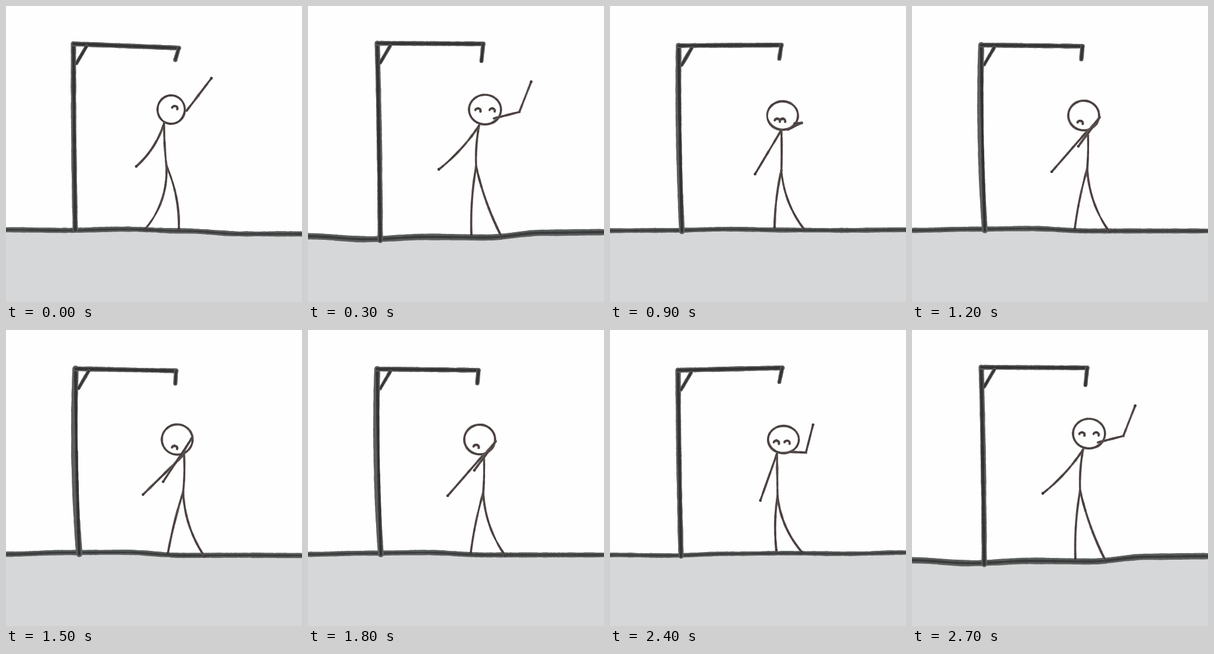
Recreate the animation shown at these times as an HTML page with a canvas. Size 500 by 500 pixels, loop 3000 ms.

```html
<!DOCTYPE html>
<html lang="en">
<head>
<meta charset="utf-8">
<title>Beckoning stick figure</title>
<style>
html, body { margin: 0; height: 100%; overflow: hidden; background: #fefefe; }
canvas { display: block; width: 100vmin; height: 100vmin; }
</style>
</head>
<body>
<canvas id="stage" width="500" height="500"></canvas>
<script>
// Joints are [x, y]; a third number bows the limb that ends there.
const reach = {
  ground: [378, 379, 377, 380, 385, 385], thick: 8.5,
  top: [114, 64], tip: [292, 71], drop: [286, 91], base: [117, 378, 1],
  head: [279, 175, 23, 24], eyes: [285, 173, 0],
  neck: [267, 198], hip: [271, 270, 1], feet: [[235, 377, -11], [292, 376, -6]],
  shoulder: [305, 177], elbow: [325, 151], hand: [347, 122], rest: [220, 271, -6]
};
const bend = {
  ground: [389, 394, 390, 391, 383, 382], thick: 10.5,
  top: [117, 63], tip: [296, 64], drop: [293, 93], base: [122, 396, -1],
  head: [299, 175, 27, 25], eyes: [287, 177, 24],
  neck: [289, 202], hip: [284, 271, 2], feet: [[276, 386, 3], [327, 390, 4]],
  shoulder: [314, 190], elbow: [357, 179], hand: [377, 128], rest: [221, 276, -4]
};
const raise = {
  ground: [380, 381, 378, 377, 378, 376], thick: 7.5,
  top: [115, 68], tip: [291, 64], drop: [286, 88], base: [120, 382, 1],
  head: [293, 185, 26, 23], eyes: [281, 191, 18],
  neck: [282, 209], hip: [283, 280, 0], feet: [[281, 372, 3], [324, 375, 8]],
  shoulder: [304, 206], elbow: [331, 207], hand: [343, 160], rest: [254, 288, 0]
};
const tuck = {
  ground: [379, 377, 376, 380, 380, 380], thick: 8.5,
  top: [117, 66], tip: [288, 68], drop: [286, 90], base: [123, 379, 4],
  head: [290, 185, 26, 25], eyes: [284, 198, 0],
  neck: [297, 210], hip: [296, 275, -1], feet: [[275, 376, 2], [333, 381, 8]],
  shoulder: [297, 212], elbow: [317, 188], hand: [281, 237], rest: [236, 280, 0]
};

// Blends numbers, lists and whole poses; k may run past 1
function mix(a, b, k) {
  if (typeof a === 'number') return a + (b - a) * k;
  if (Array.isArray(a)) return a.map((v, i) => mix(v, b[i], k));
  return Object.fromEntries(Object.keys(a).map(key => [key, mix(a[key], b[key], k)]));
}

let seed = 7;
const random = () => (seed = seed * 16807 % 2147483647) / 2147483647;

const trace = (n, point) => Array.from({ length: n + 1 }, (_, i) => point(i / n));

function line(a, b, bow = 0) {
  const dx = b[0] - a[0], dy = b[1] - a[1], len = Math.hypot(dx, dy);
  return trace(Math.ceil(len), t => {
    const off = 4 * t * (1 - t) * bow / len;
    return [a[0] + dx * t - dy * off, a[1] + dy * t + dx * off];
  });
}

const oval = (x, y, rx, ry, from, to) => trace(180, t => {
  const angle = (from + (to - from) * t) * Math.PI;
  return [x + rx * Math.cos(angle), y + ry * Math.sin(angle)];
});

function drawing(pose) {
  const canvas = document.createElement('canvas');
  canvas.width = canvas.height = 500;
  const g = canvas.getContext('2d');

  function marker(path, width, color) {
    let wobble = 0;
    g.fillStyle = color;
    g.beginPath();
    for (const [x, y] of path) {
      wobble = wobble * .9 + (random() - .5) * .25;
      const r = width / 2 + wobble;
      g.moveTo(x + r, y);
      g.arc(x, y, r, 0, 2 * Math.PI);
    }
    g.fill();
  }
  function pen(path) {
    marker(path, 4, '#6a615f');
    marker(path, 2.2, '#433b3a');
  }
  function limb(a, b) {
    pen(line(a, b, b[2]));
    marker([b], 4.6, '#433b3a');
  }
  function beam(a, b, width = 8, bow = 0) {
    marker(line(a, b, bow), width + Math.abs(bow) / 2, '#5b605e');
    marker(line(a, b, bow / 4), width * .55, '#353234');
  }

  g.fillStyle = '#fefefe';
  g.fillRect(0, 0, 500, 500);

  const ground = trace(500, t => {
    const i = Math.min(4, Math.floor(t * 5));
    const ease = (1 - Math.cos((t * 5 - i) * Math.PI)) / 2;
    return [t * 500, mix(pose.ground[i], pose.ground[i + 1], ease)];
  });
  g.fillStyle = '#d6d7d9';
  g.beginPath();
  g.moveTo(0, 500);
  for (const p of ground) g.lineTo(...p);
  g.lineTo(500, 500);
  g.fill();
  marker(ground, pose.thick, '#5b605e');
  marker(ground, pose.thick * .4, '#3c3b3c');

  const { top, tip, base, neck, hip } = pose;
  beam(top, base, 8.5, base[2]);
  beam(top, tip);
  beam(tip, pose.drop, 7);
  beam([top[0] + 22, top[1] + 4], [top[0] + 5, top[1] + 33], 6);

  pen(oval(...pose.head, 0, 2));
  const [x, y, gap] = pose.eyes;
  for (const eye of gap > 8 ? [x, x + gap] : [x]) pen(oval(eye, y, 4.5, 4, 1.1, 2.1));

  limb(neck, hip);
  for (const foot of pose.feet) limb(hip, foot);
  limb(neck, pose.rest);
  limb(pose.shoulder, pose.elbow);
  limb(pose.elbow, pose.hand);
  return canvas;
}

const sheets = [reach, bend, raise, mix(raise, tuck, .5), tuck, mix(raise, tuck, 1.25)].map(drawing);
const ctx = document.getElementById('stage').getContext('2d');
const start = performance.now();

function show(now) {
  const step = Math.floor(Math.max(0, now - start) % 3000 / 300);
  ctx.drawImage(sheets[5 - Math.abs(5 - step)], 0, 0);
  requestAnimationFrame(show);
}
show(start);
</script>
</body>
</html>
```
